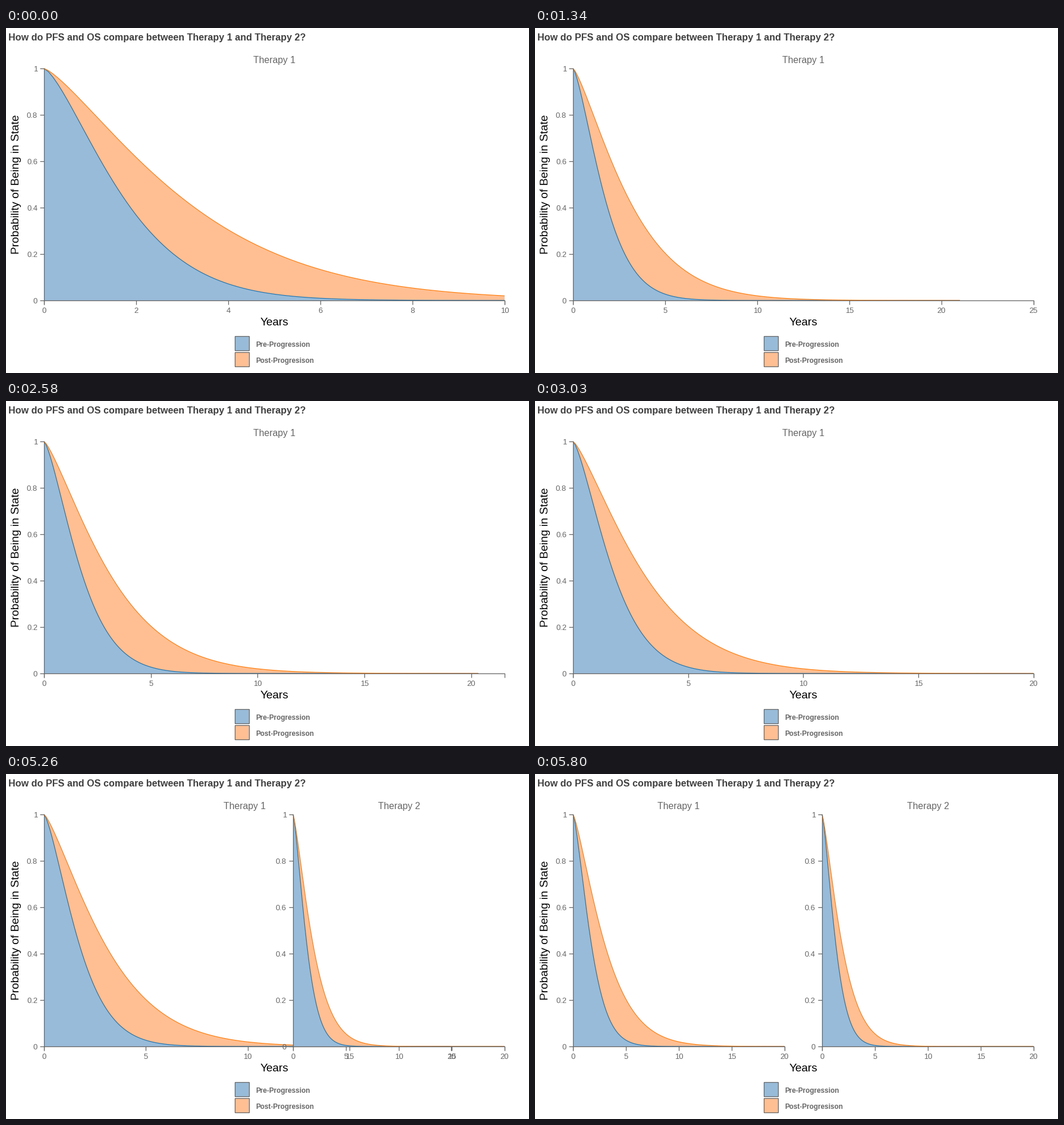
A matplotlib script for the animation above (8 s loop, 880x580 px).

```python
import numpy as np
import matplotlib.pyplot as plt
from matplotlib.animation import FuncAnimation

plt.rcParams["font.family"] = "Liberation Sans"

W, H, DPI = 880, 580, 100
INTERVAL, LOOP = 20, 8000
LEFT, RIGHT, TOP, BASE = 64, 839, 68, 458
EDGE = 864                    # labels past this x are cut off
GREY, DARK = "#666666", "#404040"
BLUE, ORANGE = "#1f77b4", "#ff7f0e"
BLUE_FILL, ORANGE_FILL = "#98bbd9", "#ffbf93"
RULE = 1.25                   # width of axes and legend borders

# Transitions: first visible step, a moment on the step grid, step, start (ms)
MOVES = [(500, 840, 60, 393), (2120, 2580, 50, 2085), (4950, 5480, 40, 4901)]
DURATION = 900
CURVE_LEAD, TITLE_LEAD = 3, 12
SECOND_PANEL_AT = 4970

YEARS = np.linspace(0, 21, 211)
# (pixels per year, last year of data) in each of the four states
STATES = [(77.5, 10), (31, 21), (38.75, 20), (17.8, 20)]


def ease(u):
    u = min(max(u, 0), 1)
    return 4 * u**3 if u < 0.5 else 1 - 4 * (1 - u)**3


def progress(t, lead=0):
    """Eased progress of every transition at time t."""
    out = []
    for first, mark, step, start in MOVES:
        now = mark + (t - mark) // step * step + lead
        out.append(0 if t < first else ease((now - start) / DURATION))
    return out


def mix(values, ps):
    """Follow a chain of values through the successive transitions."""
    v = values[0]
    for a, b, p in zip(values, values[1:], ps):
        v = v + p * (b - a)
    return v


def weibull(scale, shape):
    return lambda t: np.exp(-(t / scale)**shape)


def to_y(prob):
    return BASE - (BASE - TOP) * prob


fig = plt.figure(figsize=(W / DPI, H / DPI), dpi=DPI, facecolor="white")
ax = fig.add_axes([0, 0, 1, 1])
ax.set_xlim(0, W)
ax.set_ylim(H, 0)
ax.axis("off")


def text(x, y, s, px, color=GREY, **kw):
    return ax.text(x, y, s, fontsize=px * 72 / DPI, color=color,
                   va="baseline", **kw)


def line(xs, ys, color=GREY, width=RULE, z=1):
    return ax.plot(xs, ys, color=color, lw=width * 72 / DPI, zorder=z,
                   solid_capstyle="butt", solid_joinstyle="miter")[0]


class Panel:
    """Stacked survival areas with their axes and heading."""

    def __init__(self, left, name, pfs, os, ticks, z):
        self.left = left
        self.curves = []
        for k, (surv, fill, stroke) in enumerate(
                [(os, ORANGE_FILL, ORANGE), (pfs, BLUE_FILL, BLUE)]):
            area = ax.fill([0, 1, 1], [0, 0, 1], color=fill, lw=0,
                           zorder=z + k)[0]
            edge = line([], [], stroke, 1.2, z + 3 - k)
            ys = [to_y(surv(np.minimum(YEARS, end))) for _, end in STATES]
            self.curves.append((area, edge, ys))
        self.xs = [left + r * np.minimum(YEARS, end) for r, end in STATES]

        self.fixed = [line([left - 7, left, left, left - 7],
                           [BASE, BASE, TOP, TOP], z=z + 4)]
        for v in np.arange(6) / 5:
            y = to_y(v)
            if 0 < v < 1:
                self.fixed.append(line([left - 7, left], [y, y], z=z + 4))
            self.fixed.append(text(left - 11, y + 5, f"{v:g}", 13,
                                   ha="right", zorder=z + 5))
        self.domain = line([], [], z=z + 4)
        self.ticks = [(v, line([], [], z=z + 4),
                       text(0, 479, str(v), 13, ha="center", zorder=z + 5))
                      for v in ticks]
        self.title = text(0, 59, name, 15.8, ha="center", zorder=z + 5)

    def place(self, axis_p, curve_p, title_p, ends, alphas):
        xs = mix(self.xs, curve_p)
        for area, edge, ys in self.curves:
            y = mix(ys, curve_p)
            edge.set_data(xs, y)
            area.set_xy(np.column_stack([np.r_[xs, xs[-1], xs[0]],
                                         np.r_[y, BASE, BASE]]))
        end = mix(ends, axis_p)
        self.domain.set_data([self.left, self.left, end, end],
                             [BASE + 7, BASE, BASE, BASE + 7])
        rate = mix([r for r, _ in STATES], axis_p)
        for v, mark, label in self.ticks:
            x = self.left + rate * v
            alpha = alphas.get(v, 1)
            mark.set_data([x, x], [BASE, BASE + 7])
            label.set_x(x)
            for part in (mark, label):
                part.set_alpha(alpha)
                part.set_visible(alpha > 0 and x < EDGE)
        self.title.set_x((self.left + mix(ends, title_p)) / 2)

    def artists(self):
        parts = self.fixed + [self.domain, self.title]
        for area, edge, _ in self.curves:
            parts += [area, edge]
        for _, mark, label in self.ticks:
            parts += [mark, label]
        return parts


text(4.5, 21, "How do PFS and OS compare between Therapy 1 and Therapy 2?",
     16.1, DARK, weight="bold")
text(451.5, 500, "Years", 19, "black", ha="center", zorder=30)
text(22, 262.5, "Probability of Being in State", 19.2, "black", ha="center",
     rotation=90, rotation_mode="anchor")
for y, fill, name in [(518, BLUE_FILL, "Pre-Progression"),
                      (545, ORANGE_FILL, "Post-Progresison")]:
    ax.add_patch(plt.Rectangle((385, y), 24, 24, fc=fill, ec=GREY,
                               lw=RULE * 72 / DPI))
    text(420.5, y + 18, name, 11.7, weight="bold")

first = Panel(LEFT, "Therapy 1", weibull(2, 1.4), weibull(3.5, 1.3),
              [0, 2, 4, 5, 6, 8, 10, 15, 20, 25], 1)
second = Panel(483, "Therapy 2", weibull(1.5, 1.4), weibull(2.2, 1.3),
               [0, 5, 10, 15, 20], 11)
done = [1, 1, 1]
second.place(done, done, done, [RIGHT] * 4, {})
second_parts = second.artists()


def draw(i):
    t = i * INTERVAL
    p = progress(t)
    alphas = {v: 1 - p[0] for v in (2, 4, 6, 8)}
    alphas.update({v: p[0] for v in (5, 15, 20)})
    alphas[25] = p[0] * (1 - p[1])
    first.place(p, progress(t, CURVE_LEAD), progress(t, TITLE_LEAD),
                [RIGHT, RIGHT, RIGHT, 420], alphas)
    for part in second_parts:
        part.set_visible(t >= SECOND_PANEL_AT)
    return []


anim = FuncAnimation(fig, draw, frames=LOOP // INTERVAL, interval=INTERVAL,
                     init_func=lambda: draw(0), repeat=True, repeat_delay=0)
plt.show()
```
